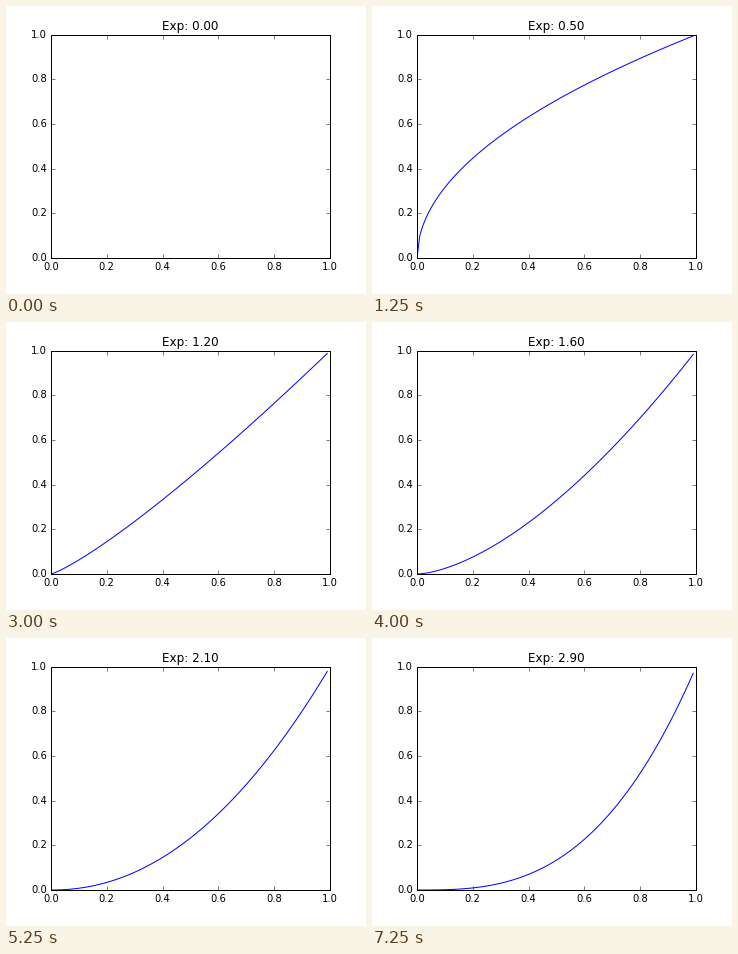
Write a matplotlib script that moves like this. It is 360 px wide and 288 px high and loops after 7500 ms.

```python
import matplotlib.pyplot as plt
import numpy as np
from matplotlib.animation import FuncAnimation

FRAMES = 30
INTERVAL = 250
STEP = 0.1

plt.style.use("classic")
plt.rcParams.update({
    "font.family": "sans-serif",
    "font.sans-serif": ["DejaVu Sans"],
    "font.size": 10,
    "axes.titlesize": 12,
    "xtick.labelsize": 10,
    "ytick.labelsize": 10,
    "figure.facecolor": "white",
    "savefig.facecolor": "white",
    "savefig.dpi": "figure",
})

fig = plt.figure(figsize=(5, 4), dpi=72)
fig.subplots_adjust(left=0.125, right=0.9, bottom=0.125, top=0.9)
ax = fig.add_subplot()
ax.set(xlim=(0, 1), ylim=(0, 1))

x = np.arange(100) / 100
curve, = ax.plot(x, x, color="blue", linewidth=1)
title = ax.set_title("")


def draw(i):
    """Show x ** exponent for step i."""
    exponent = i * STEP
    curve.set_ydata(x ** exponent)
    title.set_text(f"Exp: {exponent:.2f}")
    return curve, title


anim = FuncAnimation(fig, draw, frames=FRAMES, interval=INTERVAL,
                     repeat=True, repeat_delay=0, blit=False)
plt.show()
```
